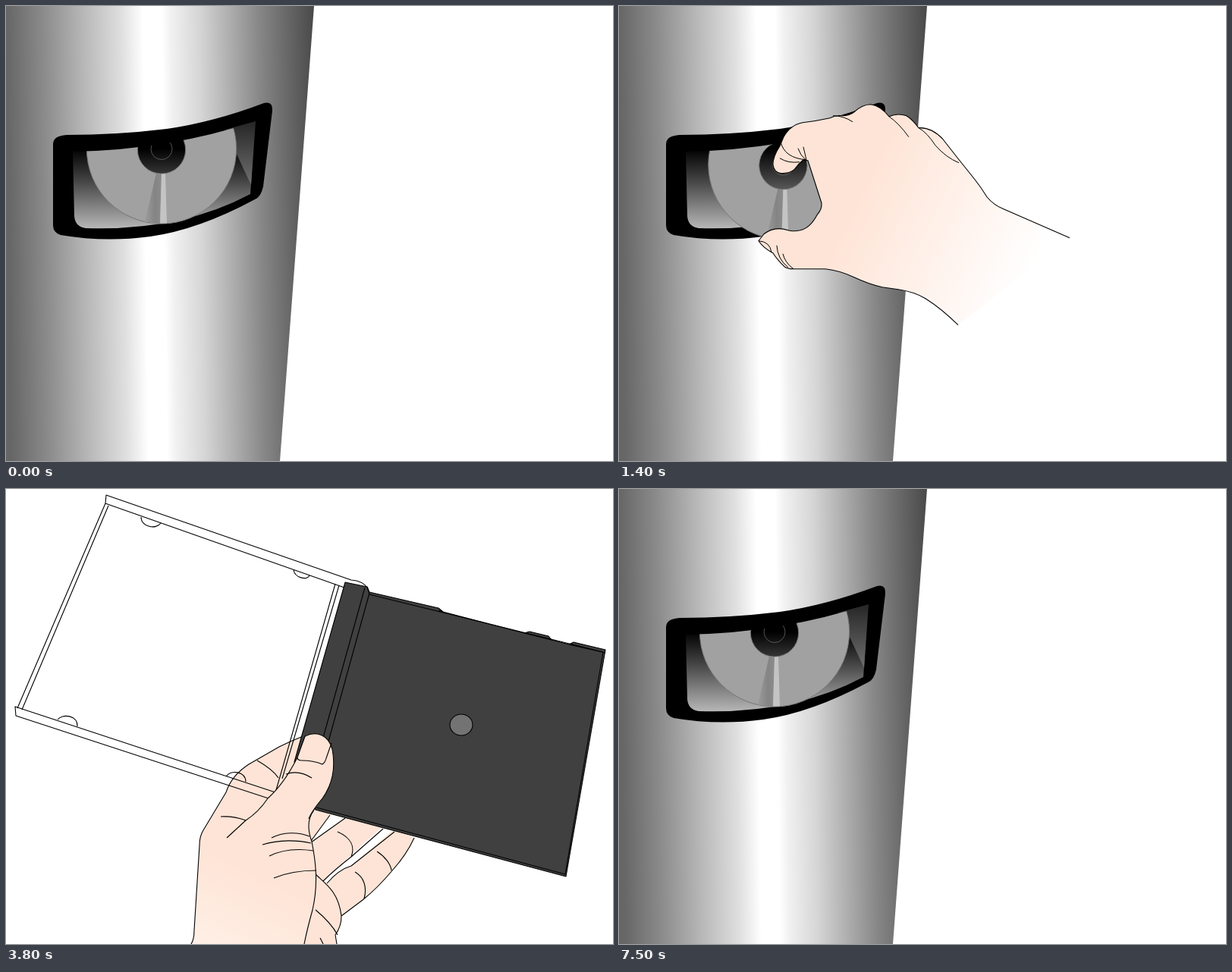
Recreate the animation shown at these times as an HTML page with a canvas. Size 800 by 600 pixels, loop 7600 ms.

```html
<!DOCTYPE html>
<html lang="en">
<head>
<meta charset="utf-8">
<title>Taking a disc out and putting it in its case</title>
<style>
html, body { margin: 0; width: 100%; height: 100%; overflow: hidden; background: #fff; }
canvas { display: block; width: 800px; height: 600px; }
</style>
</head>
<body>
<canvas id="stage" width="800" height="600"></canvas>
<script>
const ctx = document.getElementById('stage').getContext('2d');
const LOOP = 7600, STEP = 100;
const SKIN = '#fee4d6', INK = '#000', TRAY = '#404040';

const shape = d => new Path2D(d);

// Metal cylinder with its slot
const body = shape('M0 0H406L361 600H0Z');
const frame = shape('M80 170Q146 170 212 162Q274 153 340 128Q352 125 351 138L339 238Q336 252 328 255' +
  'Q254 295 190 304Q130 312 72 302Q62 299 62 289V182Q62 171 80 170Z');
const inside = shape('M88 192Q215 190 329 152L322 248Q230 297 105 293Q91 291 90 277Z');
const sideWall = shape('M289 163L329 152L323 236Z');
const belowLip = shape('M0 192H88Q215 190 329 152L800 100V600H0Z');

// Disc, centred on its hole
const disc = new Path2D();
disc.arc(0, -1, 98.6, 0, 7);
disc.closePath();
disc.moveTo(31.7, 0);
disc.arc(0, 0, 31.7, 0, 7);
const hubRing = new Path2D();
hubRing.arc(0, -1, 14, 0, 7);
const shade = shape('M-7 31L0 32L-2 97L-22 95Z');
const glint = shape('M0 32L5 32L7 97L-2 97Z');

// Gripping hand
const grip = shape('M652 397L565 359Q552 354 543 343Q535 330 527 320L503 290L485 267Q470 251 453 252' +
  'Q445 241 437 236Q425 232 414 237Q403 223 390 221Q379 221 368 231Q362 236 352 236Q344 235 336 239' +
  'Q318 243 300 245Q284 248 275 264L270 276Q261 290 261 300Q262 311 272 312Q284 312 289 307' +
  'Q295 299 301 294L307 295L325 351Q326 359 319 367Q310 384 297 387Q287 389 281 387Q263 381 249 392' +
  'L242 401Q249 411 261 417Q266 425 276 435Q280 438 288 438L330 438Q349 440 368 449Q387 458 405 462' +
  'L426 465Q447 468 462 477Q484 491 505 512');
const gripLines = shape('M414 237Q427 246 440 264M340 236Q354 236 366 244M453 252Q464 258 475 275' +
  'Q489 291 506 298M271 270Q276 292 305 294M270 292Q281 299 296 297M294 279Q297 288 304 294' +
  'M301 277L305 294M242 401Q257 402 259 416M266 407Q267 425 281 436M274 418Q277 430 288 438');

// Open case
const lid = shape('M131 19L132 8L455 120Q470 121 477 131M131 19L446 130M131 19L15 289M135 22L21 291' +
  'M346 408L13 299L12 287L355 400M434 125L356 397M439 127L364 382M178 37C178 50 198 54 204 45' +
  'M379 107C381 117 396 121 400 114M68 304C74 296 95 298 94 313M290 379C296 370 316 372 316 386');
const tray = shape('M447 123L476 129L479 136L570 157L576 162L683 190L690 188L715 194L719 199L742 205' +
  'L748 202L790 212L738 511L408 423L380 360Z');
const trayLines = shape('M473 130L416 335M479 137L423 340M476 129L479 139L787 215L737 508L409 420' +
  'M570 160L576 162M683 190L719 199M742 205L790 216');
const hub = new Path2D();
hub.ellipse(600, 311, 15, 14, 0, 0, 7);

// Hand holding the case
const fingers = shape('M398 440L410 418L427 430L402 466L447 434L470 430L494 447L418 517L423 520' +
  'Q438 502 455 497L512 448L538 460Q528 482 510 502Q490 526 470 542L442 563Q442 577 434 588' +
  'L436 600H380V470Z');
const fingerLines = shape('M427 430L402 464M402 466L447 434M418 517Q432 503 455 485L497 448' +
  'M423 520Q438 502 455 497L512 452M538 460Q528 482 510 502Q490 526 470 542L442 563Q442 577 434 588' +
  'L436 600M437 452C455 460 460 472 455 485M489 478C500 485 507 495 508 503' +
  'M460 505C472 512 476 525 472 540M408 508C420 520 438 530 442 563M408 555C420 565 430 575 437 588' +
  'M414 592L418 600');
const palm = shape('M244 600Q248 594 248 582L255 470Q255 458 260 450L290 400Q297 378 320 363' +
  'L360 340Q376 332 394 325L432 360L405 425Q394 440 403 465C408 490 412 520 404 555Q397 580 393 600');
const palmLines = shape('M331 358Q352 370 359 381M345 408Q333 426 316 437L291 460M283 432Q300 431 316 437');
const thumb = shape('M345 408C365 390 376 370 384 354L395 325C410 318 425 325 430 343' +
  'C435 370 430 390 417 408Q402 426 399 435L345 440Z');
const thumbLines = shape('M345 408C365 390 376 370 384 354L394 326C410 318 425 325 430 343' +
  'C435 370 430 390 417 408Q402 426 399 435M384 354Q384 358 390 358Q405 358 417 363Q421 360 422 355L429 335' +
  'M369 376C380 372 392 374 403 381M350 460C365 452 385 452 400 458M338 469C360 462 385 463 402 467' +
  'M347 484C365 475 385 474 405 477M353 513C370 506 390 503 409 503');

function gradient(x0, y0, x1, y1, stops) {
  const g = ctx.createLinearGradient(x0, y0, x1, y1);
  for (const [at, color] of stops) g.addColorStop(at, color);
  return g;
}

const metal = gradient(0, 0, 410, -5, [[0, '#666'], [.12, '#8b8b8b'], [.25, '#b8b8b8'], [.37, '#dfdfdf'],
  [.44, '#fff'], [.5, '#fff'], [.53, '#f1f1f1'], [.62, '#d6d6d6'], [.73, '#a9a9a9'], [.81, '#888'],
  [.89, '#6c6c6c'], [1, '#464646']]);
const depth = gradient(0, 188, 0, 294, [[0, '#000'], [.4, '#444'], [1, '#b8b8b8']]);
const wallTone = gradient(0, 155, 0, 236, [[0, '#282828'], [1, '#707070']]);
const shadeTone = gradient(-22, 0, 0, 0, [[0, '#9c9c9c'], [.6, '#848484'], [1, '#8c8c8c']]);
const gripTone = gradient(360, 365, 585, 475, [[0, SKIN], [1, '#fff']]);
const palmTone = gradient(340, 510, 280, 640, [[0, SKIN], [1, '#fff2e9']]);

function paint(path, fill, line, width = 1.1) {
  if (fill) { ctx.fillStyle = fill; ctx.fill(path, 'evenodd'); }
  if (line) { ctx.strokeStyle = line; ctx.lineWidth = width; ctx.stroke(path); }
}

function drawDisc(x, y) {
  ctx.save();
  ctx.translate(x, y);
  paint(disc, '#a1a1a1', '#777', 1);
  paint(shade, shadeTone);
  paint(glint, '#c4c4c4');
  paint(hubRing, null, '#666', .8);
  ctx.restore();
}

function drawGrip(x, y) {
  ctx.save();
  ctx.translate(x, y);
  paint(grip, gripTone, INK);
  paint(gripLines, null, INK, 1);
  ctx.restore();
}

// Distance still to go before the hand reaches its reference place, per step
const REACH = [417, 372, 318, 261, 201, 134, 67, 0, -67, -112];

function drawSlotScene(step) {
  paint(body, metal);
  paint(frame, INK);
  paint(inside, depth);
  paint(sideWall, wallTone);

  const pulled = Math.max(0, Math.min(11, step - 13));
  const dx = pulled * 125 / 11, dy = pulled * 228 / 11;
  ctx.save();
  ctx.clip(belowLip);
  drawDisc(205 + dx, 189.5 + dy);
  ctx.restore();

  if (step > 0) {
    const away = REACH[Math.min(step, 9)];
    drawGrip(away * .62 + dx, away + dy);
  }
}

function drawCaseScene(step) {
  paint(fingers, SKIN);
  paint(fingerLines, null, INK);
  paint(palm, palmTone, INK);
  paint(palmLines, null, INK);
  paint(lid, null, INK);
  paint(tray, TRAY, INK);
  paint(trayLines, null, INK);
  paint(hub, '#737373', INK);
  paint(thumb, SKIN);
  paint(thumbLines, null, INK);

  if (step > 0) {
    const left = 1 - Math.min(step, 11) / 11;
    ctx.save();
    ctx.translate(258.5 + 270 * left, -65.5 + 425 * left);
    ctx.scale(1.25, 1.25);
    drawDisc(273.5, 301);
    drawGrip(0, 0);
    ctx.restore();
  }
}

function draw(now) {
  const step = Math.floor(now % LOOP / STEP);
  ctx.fillStyle = '#fff';
  ctx.fillRect(0, 0, 800, 600);
  if (step < 38) drawSlotScene(step);
  else if (step < 75) drawCaseScene(step - 38);
  else drawSlotScene(0);
}

let start;
function tick(now) {
  start ??= now;
  draw(now - start);
  requestAnimationFrame(tick);
}
ctx.lineJoin = 'round';
draw(0);
requestAnimationFrame(tick);
</script>
</body>
</html>
```
